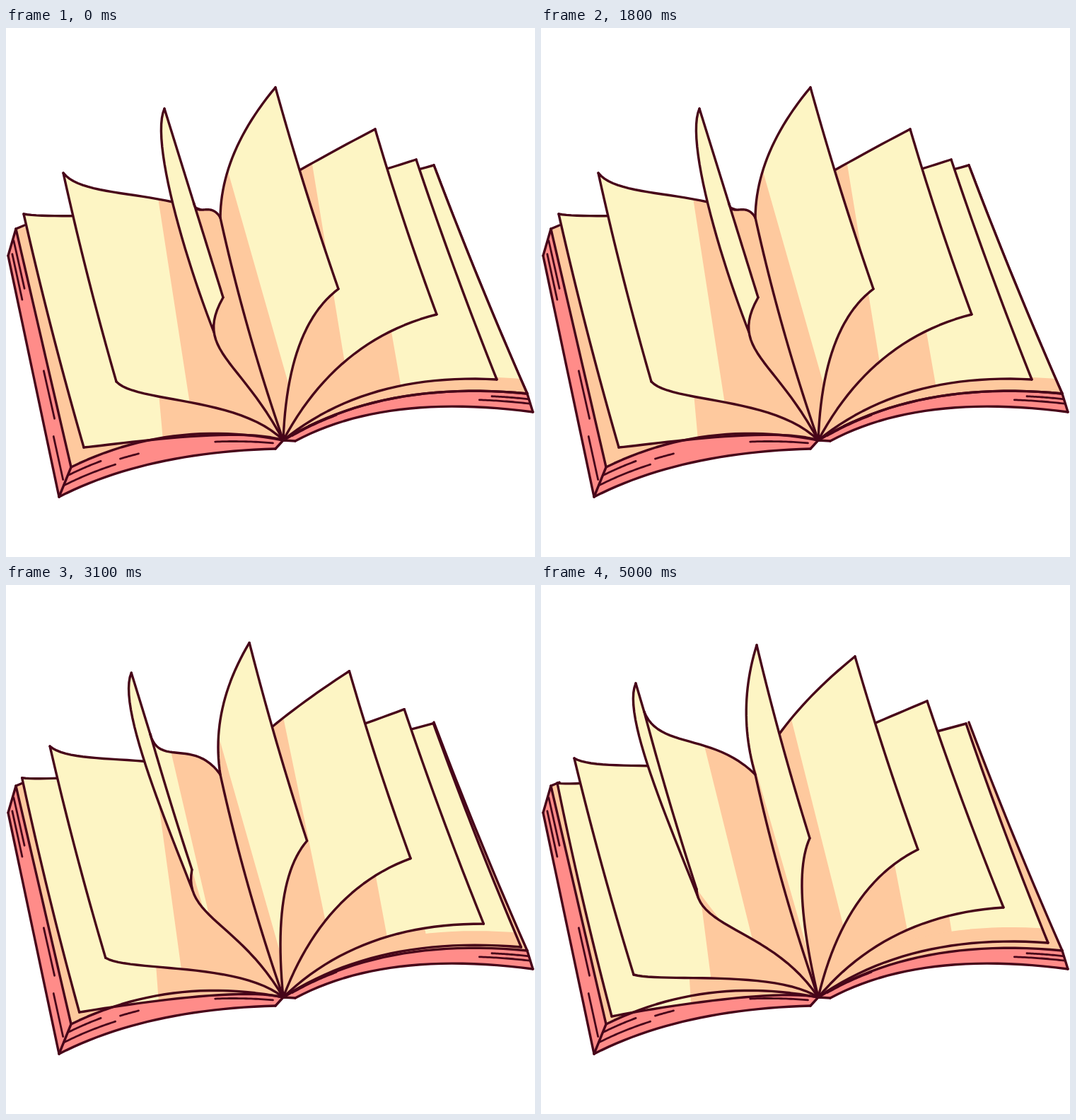
These frames come from a looping animation (748x748 px, 5110 ms). An HTML page with a canvas:

```html
<!DOCTYPE html>
<html lang="en">
<head>
<meta charset="utf-8">
<title>Turning pages</title>
<style>
html, body { margin: 0; width: 100%; height: 100%; overflow: hidden; background: #fff; }
canvas { display: block; }
</style>
</head>
<body>
<canvas id="stage" width="748" height="748"></canvas>
<script>
const ctx = document.getElementById('stage').getContext('2d');
const INK = '#470519', PAPER = '#fdf5c4', SHADE = '#fec99e', COVER = '#ff8c89';
const LOOP = 5110, STEP = 100, LAST = 50, DRAWINGS = 3;
const HINGE = [303, 268], SPINE = [392, 583];

// Way of a leaf's upper tip and lower corner, from the right cover to the left.
const TIPS = [[605, 194], [601, 196], [580, 186], [546, 164], [522, 143], [444, 101], [381, 84],
  [305, 85], [224, 114], [134, 139], [81, 205], [47, 245], [25, 263], [23, 280]];
const CORNERS = [[737, 517], [717, 506], [694, 497], [654, 456], [609, 405], [533, 374], [470, 369],
  [380, 358], [307, 381], [220, 430], [156, 500], [131, 551], [110, 593], [100, 610]];
const LEAF_ORDER = [6, 5, 4, 0, 1, 2, 3];
const HINGED_LEAF = 3;

const clamp = v => Math.max(0, Math.min(1, v));
const mix = (a, b, t) => a.map((v, i) => v + (b[i] - v) * t);
const shift = (p, dx, dy) => [p[0] + dx, p[1] + dy];

// A Bezier curve of any degree, as a function of t.
function bezier(...pts) {
  return t => {
    let row = pts;
    while (row.length > 1) row = row.slice(1).map((p, i) => mix(row[i], p, t));
    return row[0];
  };
}

// An arc from a to b whose control point is moved off the middle.
const arc = (a, b, dx = 0, dy = 0) => bezier(a, shift(mix(a, b, 0.5), dx, dy), b);

function sample(curve, from = 0, to = 1) {
  const count = 24;
  return Array.from({ length: count + 1 }, (_, i) => curve(from + (to - from) * i / count));
}

function along(track, position) {
  const at = i => track[Math.max(0, Math.min(track.length - 1, i))];
  const i = Math.floor(position), t = position - i;
  const [a, b, c, d] = [at(i - 1), at(i), at(i + 1), at(i + 2)];
  return bezier(b, shift(b, (c[0] - a[0]) / 6, (c[1] - a[1]) / 6),
    shift(c, (b[0] - d[0]) / 6, (b[1] - d[1]) / 6), c)(t);
}

function trace(pts) {
  ctx.beginPath();
  pts.forEach(p => ctx.lineTo(...p));
}

function fill(color, ...parts) {
  trace(parts.flat());
  ctx.closePath();
  ctx.fillStyle = color;
  ctx.fill();
}

function stroke(pts, width = 3.4, color = INK) {
  trace(pts);
  ctx.lineWidth = width;
  ctx.strokeStyle = color;
  ctx.stroke();
}

const rightFoot = corner => arc(corner, SPINE, -33, -53);

// The lower corner of a left leaf trails behind, so its foot starts with a hook.
function leftFoot(corner) {
  const drop = Math.max(0, corner[1] - 381);
  return bezier(corner,
    shift(corner, 6.3 * Math.sqrt(drop) - 42, 74 - 0.37 * drop),
    shift(SPINE, -62, -25 - 0.45 * (SPINE[1] - corner[1])), SPINE);
}

function rightTop(tip) {
  return arc(HINGE, tip, -38 * Math.sin(Math.PI * (tip[0] - 220) / 330));
}

function leftTop(tip) {
  const width = HINGE[0] - tip[0];
  const lift = 60 * Math.sin(Math.PI * width / 290);
  return bezier(HINGE, shift(HINGE, -0.38 * width, -lift),
    shift(tip, 0.13 * width, 0.9 * lift), tip);
}

const gutter = arc(SPINE, HINGE, -10, 0);

function drawLeaf(index, phase) {
  const tip = along(TIPS, 2 * index + phase);
  const corner = along(CORNERS, 2 * index + phase);
  const isLeft = tip[0] < 260;
  const fold = isLeft ? clamp((tip[0] - 100) / 124) : 0;
  const shoulder = mix(tip, corner, fold / 2);
  const top = isLeft ? leftTop(shoulder) : rightTop(tip);
  const foot = isLeft ? leftFoot(corner) : rightFoot(corner);
  const edge = sample(arc(shoulder, corner, -5 * (1 - fold)));
  const topLine = sample(top), footLine = sample(foot);

  if (fold) {
    const outline = sample(bezier(tip, shift(tip, -20, 45),
      shift(foot(0.27 * fold), -41, -105), foot(0.27 * fold)));
    fill(PAPER, outline, sample(foot, 0.27 * fold, 0));
    stroke(outline);
    stroke([tip, shoulder]);
  }

  const body = [topLine, edge, footLine, sample(gutter)];
  fill(PAPER, ...body);
  const reach = Math.abs(shoulder[0] - HINGE[0]);
  const topShade = clamp(isLeft ? 0.33 + 0.7 * fold ** 2 : 0.22 + 0.0018 * reach);
  const footShade = clamp(0.15 + 0.0015 * Math.abs(corner[0] - SPINE[0]) + fold ** 3);
  fill(SHADE, sample(top, 0, topShade), sample(foot, 1 - footShade, 1), sample(gutter));
  if (fold) fill(SHADE, sample(foot, 0, 0.35));

  if (index === 0) {
    ctx.save();
    trace(body.flat());
    ctx.clip();
    stroke(footLine, 40, SHADE);
    ctx.restore();
  }
  [topLine, edge, footLine].forEach(pts => stroke(pts));
  if (index === HINGED_LEAF) stroke(sample(gutter));
}

const topLeft = [14, 284], shoulderLeft = [3, 322], innerLeft = [92, 621], outerLeft = [75, 663];
const side = { inner: arc(topLeft, innerLeft), outer: arc(shoulderLeft, outerLeft) };
const front = { inner: arc(innerLeft, SPINE, -10, -50), outer: arc(outerLeft, [381, 595], -30, -29) };
const frontRight = {
  inner: t => rightFoot(CORNERS[0])(1 - t),
  outer: arc([409, 584], [745, 543], -40, -48)
};
const faces = [side, front, frontRight];
const rightEdge = arc(TIPS[0], CORNERS[0], -5);

function drawBlock() {
  fill(SHADE, sample(side.inner), sample(front.inner), sample(frontRight.inner),
    sample(rightEdge, 1, 0), [shift(HINGE, 0, 22), [60, 290], [25, 281]]);
  fill(COVER, [topLeft], sample(side.outer), sample(side.inner, 1, 0));
  for (const { inner, outer } of [front, frontRight]) {
    fill(COVER, sample(inner), sample(outer, 1, 0));
  }
  stroke([topLeft, [26, 279]]);
  stroke(sample(rightEdge));
}

// A thin line between the two borders of a face.
function hatch({ inner, outer }, depth, from, to) {
  stroke(sample(t => mix(inner(t), outer(t), depth), from, to), 2.8);
}

function drawCover() {
  for (const { inner, outer } of faces) {
    stroke(sample(inner));
    stroke(sample(outer));
  }
  stroke([topLeft, shoulderLeft]);
  stroke([innerLeft, outerLeft]);
  stroke([front.outer(1), SPINE, frontRight.outer(0)]);
  stroke([CORNERS[0], frontRight.outer(1)]);

  hatch(side, 0.67, 0.03, 0.22);
  hatch(side, 0.35, 0.01, 0.21);
  hatch(side, 0.3, 0.56, 0.76);
  hatch(side, 0.58, 0.8, 0.98);
  hatch(front, 0.28, 0, 0.17);
  hatch(front, 0.62, 0, 0.27);
  hatch(front, 0.45, 0.28, 0.37);
  hatch(front, 0.4, 0.72, 0.97);
  hatch(frontRight, 0.1, 0.04, 0.25);
  hatch(frontRight, 0.55, 0.82, 1);
  hatch(frontRight, 0.3, 0.87, 1);
}

function frame(now) {
  const index = Math.min(LAST, Math.floor((now % LOOP) / STEP));
  const phase = index % DRAWINGS / (DRAWINGS - 1);
  ctx.clearRect(0, 0, 748, 748);
  ctx.lineCap = ctx.lineJoin = 'round';
  drawBlock();
  LEAF_ORDER.forEach(leaf => drawLeaf(leaf, phase));
  drawCover();
}

const start = performance.now();
function tick() {
  frame(performance.now() - start);
  requestAnimationFrame(tick);
}
tick();
</script>
</body>
</html>
```
